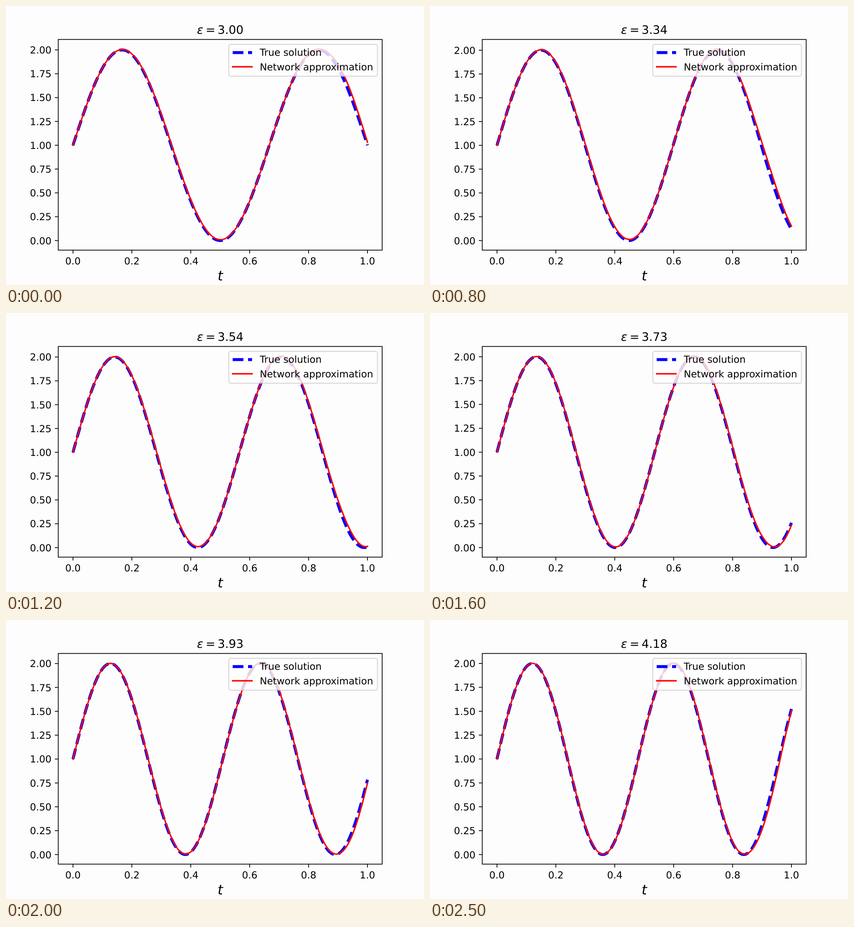
These frames come from a looping animation (917x611 px, 2.6 s). An HTML page:

```html
<!DOCTYPE html>
<html lang="en">
<head>
<meta charset="utf-8">
<title>Solution and approximation</title>
<style>
  html, body { margin: 0; width: 100%; height: 100%; overflow: hidden; background: #fdfdfd; }
  svg { display: block; width: 917px; height: 611px; }
  text { font-family: "DejaVu Sans", Verdana, sans-serif; text-rendering: geometricPrecision; fill: #000; }
</style>
</head>
<body>
<svg id="plot" viewBox="0 0 917 611"></svg>
<script>
const W = 917, H = 611, PT = W / 432;
const LEFT = 0.125 * W, RIGHT = 0.9 * W, TOP = 0.12 * H, BOTTOM = 0.875 * H;
const SAMPLES = 400, STEP_MS = 100, STEPS = 26;
const MARGIN = 0.05, TICK = 3.5 * PT;
const svg = document.getElementById("plot");

function add(tag, attrs, text) {
  const el = document.createElementNS("http://www.w3.org/2000/svg", tag);
  for (const key in attrs) el.setAttribute(key, attrs[key]);
  if (text !== undefined) el.textContent = text;
  svg.appendChild(el);
  return el;
}

const label = (x, y, pt, text, more) =>
  add("text", { x, y, "font-size": pt * PT, ...more }, text);
const tickLine = attrs => add("line", { stroke: "#000", "stroke-width": 1.65, ...attrs });

const BLUE = {
  fill: "none", stroke: "#00f", "stroke-width": 3 * PT,
  "stroke-dasharray": `${11.1 * PT} ${4.8 * PT}`, "stroke-linejoin": "round"
};
const RED = {
  fill: "none", stroke: "#f00", "stroke-width": 1.5 * PT,
  "stroke-linecap": "square", "stroke-linejoin": "round"
};

const plotX = t => LEFT + (RIGHT - LEFT) * (t + MARGIN) / (1 + 2 * MARGIN);

// Axes
for (let i = 0; i <= 5; i++) {
  const x = plotX(i / 5);
  tickLine({ x1: x, x2: x, y1: BOTTOM, y2: BOTTOM + TICK });
  label(x, 566, 10, (i / 5).toFixed(1), { "text-anchor": "middle" });
}
const yTicks = Array.from({ length: 9 }, (_, i) => ({
  value: i / 4,
  line: tickLine({ x1: LEFT - TICK, x2: LEFT }),
  text: label(LEFT - 2 * TICK, 0, 10, (i / 4).toFixed(2), { "text-anchor": "end" })
}));
label((LEFT + RIGHT) / 2, 601, 14, "t", { "text-anchor": "middle", "font-style": "italic" });

// Curves and frame
const truth = add("path", BLUE);
const network = add("path", RED);
add("rect", {
  x: LEFT, y: TOP, width: RIGHT - LEFT, height: BOTTOM - TOP,
  fill: "none", stroke: "#000", "stroke-width": 1.65
});

// Title
label(419, 61, 12, "ε", { "font-style": "italic" });
label(437.9, 61, 12, "=");
const title = label(464.3, 61, 12, "");

// Legend
add("rect", {
  x: 488.8, y: 83.9, width: 326, height: 69.8, rx: 4.2,
  fill: "#fff", stroke: "#ccc", "stroke-width": 2, opacity: 0.8
});
add("path", { ...BLUE, d: "M497.3 102H539.8" });
add("path", { ...RED, d: "M497.3 133.2H539.8" });
label(556.7, 109.3, 10, "True solution");
label(556.7, 140.5, 10, "Network approximation");

const bell = (x, width) => Math.exp(-((x / width) ** 2));
const exact = (t, eps) => 1 + Math.sin(Math.PI * eps * t);

// The fit lags most near the right end and sits slightly high.
function fitted(t, eps) {
  const centre = 0.955 - 0.11 * (eps - 3.55) ** 2;
  const lag = 0.001 * Math.min(1, t / 0.3) + 0.005 * bell(t - centre, 0.07);
  const lift = (0.004 + 0.008 * bell(eps - 3.3, 0.45)) * Math.min(1, t / 0.4);
  return exact(t - lag, eps) + lift;
}

function draw(step) {
  const eps = 3 + Math.max(0, step - 1) * 2.4 / 49;
  const sample = f => Array.from({ length: SAMPLES + 1 }, (_, i) => f(i / SAMPLES, eps));
  const a = sample(exact), b = sample(fitted);
  const low = Math.min(...a, ...b), high = Math.max(...a, ...b);
  const pad = MARGIN * (high - low);
  const plotY = v => BOTTOM - (BOTTOM - TOP) * (v - low + pad) / (high - low + 2 * pad);
  const path = values => "M" + values.map((v, i) =>
    plotX(i / SAMPLES).toFixed(2) + " " + plotY(v).toFixed(2)).join("L");

  truth.setAttribute("d", path(a));
  network.setAttribute("d", path(b));
  title.textContent = eps.toFixed(2);
  for (const { value, line, text } of yTicks) {
    const y = plotY(value);
    line.setAttribute("y1", y);
    line.setAttribute("y2", y);
    text.setAttribute("y", y + 7.9);
  }
}

let shown = -1;
function tick() {
  const step = Math.floor(performance.now() / STEP_MS) % STEPS;
  if (step !== shown) draw(shown = step);
  requestAnimationFrame(tick);
}
tick();
</script>
</body>
</html>
```
